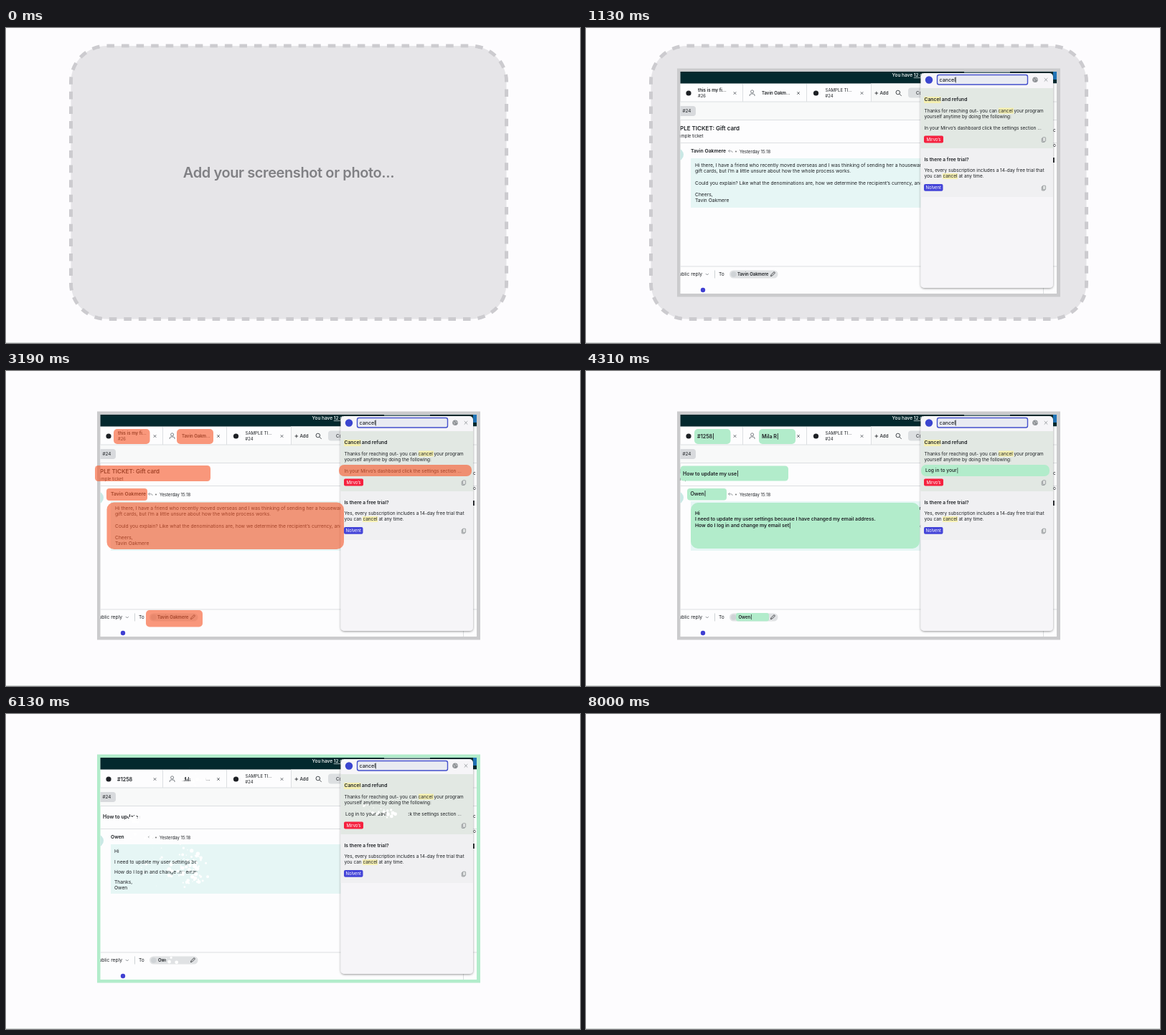
An HTML page for the animation above (8310 ms loop, 800 by 440 pixels).

```html
<!DOCTYPE html>
<html lang="en">
<head>
<meta charset="utf-8">
<title>Screenshot editing</title>
<style>
  html, body { margin: 0; width: 100%; height: 100%; overflow: hidden; background: #fdfcfe; }
  svg { display: block; width: 800px; height: 440px; }
  text { font-family: Inter, "Liberation Sans", sans-serif; white-space: pre; }
</style>
</head>
<body>
<svg id="stage" viewBox="0 0 800 440" xmlns="http://www.w3.org/2000/svg"></svg>
<script>
const LOOP = 8310;
const INK = '#1d2024', LINE = '#dcdfe1', GREEN = '#b2eccb';
const PERSON = 'Tavin Oakmere';

const $ = id => document.getElementById(id);
const clamp = v => Math.max(0, Math.min(1, v));
const ramp = (t, from, to) => clamp((t - from) / (to - from));
const easeOut = v => 1 - (1 - v) ** 3;
const ease = v => v * v * (3 - 2 * v);
const mix = (a, b, k) => `rgb(${a.map((v, i) => Math.round(v + (b[i] - v) * k))})`;

// y is the vertical middle of the text
const text = (x, y, size, str, weight = 400, extra = '') =>
  `<text x="${x}" y="${y + size * 0.36}" font-size="${size}" font-weight="${weight}" fill="${INK}" ${extra}>${str}</text>`;
const rect = (x, y, w, h, fill, r = 0, extra = '') =>
  `<rect x="${x}" y="${y}" width="${w}" height="${h}" rx="${r}" fill="${fill}" ${extra}/>`;
const dot = (x, y, r, fill) => `<circle cx="${x}" cy="${y}" r="${r}" fill="${fill}"/>`;
const stroke = (d, color = LINE, width = 1) =>
  `<path d="${d}" fill="none" stroke="${color}" stroke-width="${width}"/>`;
const cross = (x, y, color = '#4a4f55', s = 1.8) =>
  stroke(`M${x - s} ${y - s}l${2 * s} ${2 * s}m0 ${-2 * s}l${-2 * s} ${2 * s}`, color, 0.8);
const copyIcon = y =>
  rect(635.2, y - 2.6, 4.2, 5.6, '#d2d5d4', 0.8, 'stroke="#85898b" stroke-width=".7"') +
  rect(636.4, y - 3.8, 4.2, 5.6, '#dfe2e1', 0.8, 'stroke="#85898b" stroke-width=".7"');

// Editable regions; box arrays are x, y, width, height, radius
const regions = [
  { red: [150, 81, 50.5, 21, 5], green: [151, 81, 50.5, 21, 5],
    old: text(156, 87, 6.2, 'this is my fi...', 600) + text(156, 95, 5.9, '#26'),
    now: text(155, 91, 7.2, '#1258', 600),
    typed: { x: 155, y: 91, size: 7.2, weight: 600, rate: 14, lines: ['#1258'] },
    wipe: [5450, 5950], lead: 24, count: 50 },
  { red: [238, 81, 51, 21, 5], green: [241, 81, 51, 21, 5],
    old: text(245, 91, 6, 'Tavin Oakm...', 600),
    now: text(245, 91, 7.2, 'Mila R', 600),
    typed: { x: 245, y: 91, size: 7.2, weight: 600, rate: 10, lines: ['Mila R'] },
    wipe: [5800, 6650], lead: 18, count: 90 },
  { red: [124, 132, 161, 22, 4.5], green: [131.5, 132.5, 150.5, 21, 4.5],
    old: text(214, 140, 8, 'SAMPLE TICKET: Gift card', 600, 'text-anchor="end"') +
         text(163.5, 150.5, 6, 'Sample ticket', 400, 'text-anchor="end"'),
    now: text(135, 143, 7, 'How to update my user settings', 600),
    typed: { x: 135, y: 143, size: 7, weight: 600, rate: 27, lines: ['How to update my user settings'] },
    wipe: [5800, 6650], lead: 24, count: 90 },
  { red: [140, 164, 57, 17, 4], green: [141, 164, 55, 16.5, 4],
    old: text(146, 172, 6.8, PERSON, 600),
    now: text(146, 172, 6.7, 'Owen', 600),
    typed: { x: 145.5, y: 172, size: 6.9, weight: 600, rate: 8, lines: ['Owen'] },
    wipe: [5600, 6200], lead: 60, count: 50 },
  { red: [140.5, 183.5, 330.5, 65.5, 10], green: [146, 184, 319, 64, 10],
    old: [
      [192, 'Hi there, I have a friend who recently moved overseas and I was thinking of sending her a housewarming'],
      [200, 'gift cards, but I’m a little unsure about how the whole process works.'],
      [216.5, 'Could you explain? Like what the denominations are, how we determine the recipient’s currency, and'],
      [233, 'Cheers,'], [241, PERSON]
    ].map(([y, s]) => text(152, y, 6.7, s)).join(''),
    now: [
      [192, 'Hi'],
      [206.5, 'I need to update my user settings because I have changed my email address.'],
      [221, 'How do I log in and change my email settings?'],
      [235, 'Thanks,'], [242.5, 'Owen']
    ].map(([y, s]) => text(151, y, 6.7, s)).join(''),
    typed: { x: 152, y: 198.5, size: 6.8, weight: 600, rate: 156, lines: [
      'Hi',
      'I need to update my user settings because I have changed my email address.',
      'How do I log in and change my email settings?',
      'Thanks,', 'Owen'] },
    wipe: [5800, 6650], lead: 400, count: 620 },
  { red: [195, 334, 79, 23.5, 5], green: [209, 338, 46, 11.5, 3],
    old: text(211, 344, 6, PERSON, 600),
    now: text(212, 344, 6, 'Owen', 600),
    typed: { x: 212.5, y: 344, size: 6, weight: 600, rate: 8, lines: ['Owen'] },
    wipe: [5800, 6650], lead: 90, count: 60 },
  { red: [464, 131, 185, 16, 7], green: [467, 131, 179, 16, 7], onPanel: true,
    old: text(471.5, 139.3, 6.45, 'In your Mirvo’s dashboard click the settings section ...'),
    now: text(473, 139.3, 6.6, 'Log in to your dashboard'),
    typed: { x: 473, y: 139, size: 6.7, weight: 500, rate: 20, lines: ['Log in to your dashboard'] },
    wipe: [5800, 6650], lead: 24, count: 170 }
];

const wipeLayer = (r, i) => `
  <clipPath id="oldClip${i}"><rect y="0" width="1200" height="440"/></clipPath>
  <clipPath id="nowClip${i}"><rect x="0" y="0" width="0" height="440"/></clipPath>
  <g clip-path="url(#oldClip${i})">${r.old}</g>
  <g clip-path="url(#nowClip${i})">${r.now}</g>`;

const typedLayer = ({ typed: d }, i) => d.lines.map((_, n) =>
  text(d.x, d.y + n * 8.5, d.size, '', d.weight, `id="typed${i}-${n}"`)).join('');

const layers = onPanel => regions.map((r, i) => !!r.onPanel === onPanel ? wipeLayer(r, i) : '').join('');

const placeholder = `<g id="placeholder">
  ${rect(90.5, 25, 607, 381.5, '#e6e5e8', 50, 'stroke="#cccbcf" stroke-width="5" stroke-dasharray="10.55 10"')}
  ${rect(93, 27.5, 602, 376.5, '#e6e5e8', 48)}
  <text x="394" y="209" text-anchor="middle" font-size="20" font-weight="600" letter-spacing="-.4" fill="#808084">Add your screenshot or photo...</text>
</g>`;

const appWindow = `
  ${rect(131, 61, 526, 310, '#fdfdfe')}
  ${rect(131, 61, 526, 16.5, '#03292e')}
  ${rect(527, 61, 64, 1.5, '#8fa3a5')}${rect(651, 61, 6, 11, '#1f73b7')}
  <text x="426.5" y="68.4" font-size="6.5" font-weight="500" fill="#fff">You have <tspan text-decoration="underline">12 days</tspan></text>
  ${rect(397, 77.5, 260, 25.5, '#f8f9f9')}${rect(131, 103, 526, 25.5, '#f8f9f9')}
  ${stroke('M131 103H657M131 128.5H657M131 160.5H657M218.5 78V103M307.5 78V103M397.5 78V103')}
  ${dot(143, 91, 3.6, INK)}${dot(320.5, 91, 3.6, INK)}
  ${cross(207.5, 91)}${cross(296, 91)}${cross(384.5, 91)}
  ${stroke('M229.6 88.8a2 2 0 1 0 4 0a2 2 0 1 0-4 0M228.2 95v-1q0-2 2-2h2.800q2 0 2 2v1', '#5a6066', 0.8)}
  ${text(333.500, 87, 6.1, 'SAMPLE TI...')}${text(333.5, 95, 5.9, '#24')}
  ${stroke('M402.500 91h4.600m-2.300-2.300v4.600', INK, 0.8)}${text(409.5, 91, 6.2, 'Add', 500)}
  ${stroke('M432 90a2.800 2.800 0 1 0 5.600 0a2.800 2.800 0 1 0-5.600 0M437 92.200l2.600 2.600', '#33383d', 0.9)}
  ${rect(449, 83.5, 60, 14, '#dcdfe1', 4)}${text(460, 91, 6.2, 'Conversations')}
  ${rect(120, 109, 33, 14, '#d8dadd', 4)}${text(134.5, 116, 6.4, '#24')}
  ${dot(127, 177, 9, '#c9e8e5')}
  ${stroke('M200.500 169.800l-2 2l2 2m-2-2h3.600q2 0 2 2.200', '#777c81', 0.7)}
  ${dot(209, 172.5, 0.9, '#666')}${text(214, 172.5, 5.95, 'Yesterday 15:18')}
  ${rect(146, 182, 340, 69, '#e6f6f5')}
  ${stroke('M131 333H657M637.500 333V371')}${stroke('M179.500 338.500V349.500', '#c2c7cb', 0.8)}
  ${text(162, 344, 6.7, 'Public reply', 400, 'text-anchor="end"')}
  ${stroke('M166.800 343l2 2l2-2', '#777c81', 0.8)}${text(185, 344, 6.7, 'To')}
  ${rect(200, 338.5, 67.500, 11, '#e0e2e4', 5.5)}${dot(205.8, 344, 3.8, '#cfd3d6')}
  ${stroke('M257.500 346.600l.600-2l4-4l1.400 1.400l-4 4z', INK, 0.8)}
  ${dot(163, 366, 3.2, '#4040d2')}
  ${text(651, 143, 6.5, 'c')}${text(651, 164, 6.5, 'o')}${rect(651, 181, 1.8, 7, INK)}`;

const panel = `
  ${rect(466.5, 63, 184.500, 300, '#f6f5f8', 5, 'filter="url(#shadow)"')}
  ${rect(466.5, 84, 184.500, 84, '#e2e8e3')}${rect(466.5, 168, 184.500, 68, '#f0f0f2')}
  ${dot(478, 72.5, 5.2, '#3b45cf')}
  ${rect(489.5, 65.5, 126, 13.5, '#e9ebf2', 2.5, 'stroke="#4450cc" stroke-width="1.400"')}
  ${text(492.5, 72.3, 7.1, 'cancel', 500)}${rect(514.8, 68.500, 0.8, 8, INK)}
  ${dot(626, 72.3, 3.8, '#8f9296')}${stroke('M623.500 71l2 1.500l-1 2M626.500 69.500l1 2l2 .500', '#dcdde0', 0.8)}
  ${cross(641, 72.3, '#8f9296', 2.3)}
  ${rect(471, 96, 23.5, 9, '#f4efb0')}${rect(575, 111.500, 21, 8, '#f4efb0')}${rect(497, 203, 21, 8, '#f6f0b4')}
  ${text(471.5, 100, 6.75, 'Cancel and refund', 600)}
  ${text(471.5, 115.3, 6.45, 'Thanks for reaching out- you can cancel your program')}
  ${text(471.5, 123.3, 6.45, 'yourself anytime by doing the following:')}
  ${rect(471, 150.5, 27, 10, '#f5213f', 2)}
  <text x="484.500" y="157.500" text-anchor="middle" font-size="5.900" fill="#fff">Mirvo’s</text>
  ${copyIcon(156.500)}
  ${text(471.5, 183.5, 6.7, 'Is there a free trial?', 600)}
  ${text(471.5, 199, 6.45, 'Yes, every subscription includes a 14-day free trial that')}
  ${text(471.5, 207, 6.45, 'you can cancel at any time.')}
  ${rect(471, 218, 26.5, 9.8, '#4444d8', 2)}
  <text x="484.200" y="225" text-anchor="middle" font-size="5.900" fill="#fff">Nolvent</text>
  ${copyIcon(224)}`;

$('stage').innerHTML = `
  <defs>
    <clipPath id="screen"><rect x="131.500" y="61" width="524.500" height="310"/></clipPath>
    <filter id="shadow" x="-10%" y="-10%" width="120%" height="120%">
      <feDropShadow dx="0" dy="1" stdDeviation="1.800" flood-opacity=".4"/>
    </filter>
  </defs>
  ${rect(0, 0, 800, 440, '#fdfcfe')}${rect(0, 439, 800, 1, '#d2d6d5')}
  ${placeholder}
  <g id="shot">
    <rect id="frame" x="127" y="56.500" width="534" height="319"/>
    <g clip-path="url(#screen)">${appWindow}${layers(false)}${panel}${layers(true)}</g>
    <g id="reds">${regions.map(r => rect(...r.red.slice(0, 4), '#f75a2c', r.red[4])).join('')}</g>
    <g id="greens">${regions.map((r, i) =>
      rect(...r.green.slice(0, 4), GREEN, r.green[4]) + typedLayer(r, i)).join('')}</g>
    ${regions.map((_, i) => `<path id="sparks${i}" fill="#fff"/>`).join('')}
  </g>`;

const noise = n => {
  const v = Math.sin(n * 127.1 + 11.7) * 43758.5453;
  return v - Math.floor(v);
};

function sparks(region, index, p) {
  const [x, y, w, h] = region.green;
  let d = '';
  for (let i = 0; i < region.count; i++) {
    const k = index * 5000 + i * 5;
    const life = 0.08 + 0.2 * noise(k + 1) ** 2;
    const age = (p - noise(k)) / life;
    if (age <= 0 || age >= 1) continue;
    const angle = noise(k + 2) * 2 * Math.PI;
    const reach = Math.sqrt(noise(k + 3)) * (0.6 + 0.4 * age);
    const cx = x + noise(k) * w + Math.cos(angle) * reach * 24;
    const cy = y + h / 2 - 5 * age + Math.sin(angle) * reach * (h / 2 + 4);
    const r = (0.8 + 2.4 * noise(k + 4)) * (1 - age * age);
    d += `M${(cx - r).toFixed(1)} ${cy.toFixed(1)}a${r} ${r} 0 1 0 ${2 * r} 0a${r} ${r} 0 1 0 ${-2 * r} 0`;
  }
  return d;
}

function updateTyping({ typed }, index, t) {
  let left = Math.floor(Math.max(0, t - 3570) / 1000 * typed.rate);
  let open = true;
  typed.lines.forEach((line, n) => {
    const last = n === typed.lines.length - 1;
    const here = open && (left <= line.length || last);
    $(`typed${index}-${n}`).textContent = open ? line.slice(0, left) + (here ? '|' : '') : '';
    if (here) open = false;
    left -= line.length;
  });
}

function updateWipe(region, index, t) {
  const [from, to] = region.wipe;
  const p = (t - from) / (to - from);
  const [x, , w] = region.green;
  const edge = p <= 0 ? -600 : p >= 1 ? 1200 : x + p * w;
  $(`oldClip${index}`).firstChild.setAttribute('x', p <= 0 ? 0 : edge + region.lead);
  $(`nowClip${index}`).firstChild.setAttribute('width', Math.max(0, edge - 4));
  $(`sparks${index}`).setAttribute('d', p > 0 && p < 1.3 ? sparks(region, index, p) : '');
}

function draw(t) {
  const pulse = 1 + 0.05 * (ease(ramp(t, 690, 850)) - ease(ramp(t, 920, 1100)));
  $('placeholder').setAttribute('transform',
    `translate(394 216) scale(${pulse}) translate(-394 -216)`);
  $('placeholder').setAttribute('opacity', 1 - ease(ramp(t, 1580, 2150)));

  const drop = easeOut(ramp(t, 680, 1110));
  $('shot').setAttribute('transform', `translate(0 ${-390 * (1 - drop)})`);
  $('shot').setAttribute('opacity', 1 - ease(ramp(t, 7640, 7990)));
  $('frame').setAttribute('fill', mix([203, 203, 205], [178, 236, 203], ease(ramp(t, 5060, 5500))));

  const swap = ramp(t, 3310, 3500);
  $('reds').setAttribute('opacity', 0.62 * ease(ramp(t, 2440, 2900)) * (1 - swap));
  $('greens').setAttribute('opacity', swap * (1 - ramp(t, 5550, 5850)));

  regions.forEach((region, i) => {
    updateTyping(region, i, t);
    updateWipe(region, i, t);
  });
}

const start = performance.now();
function tick() {
  draw((performance.now() - start) % LOOP);
  requestAnimationFrame(tick);
}
draw(0);
requestAnimationFrame(tick);
</script>
</body>
</html>
```
